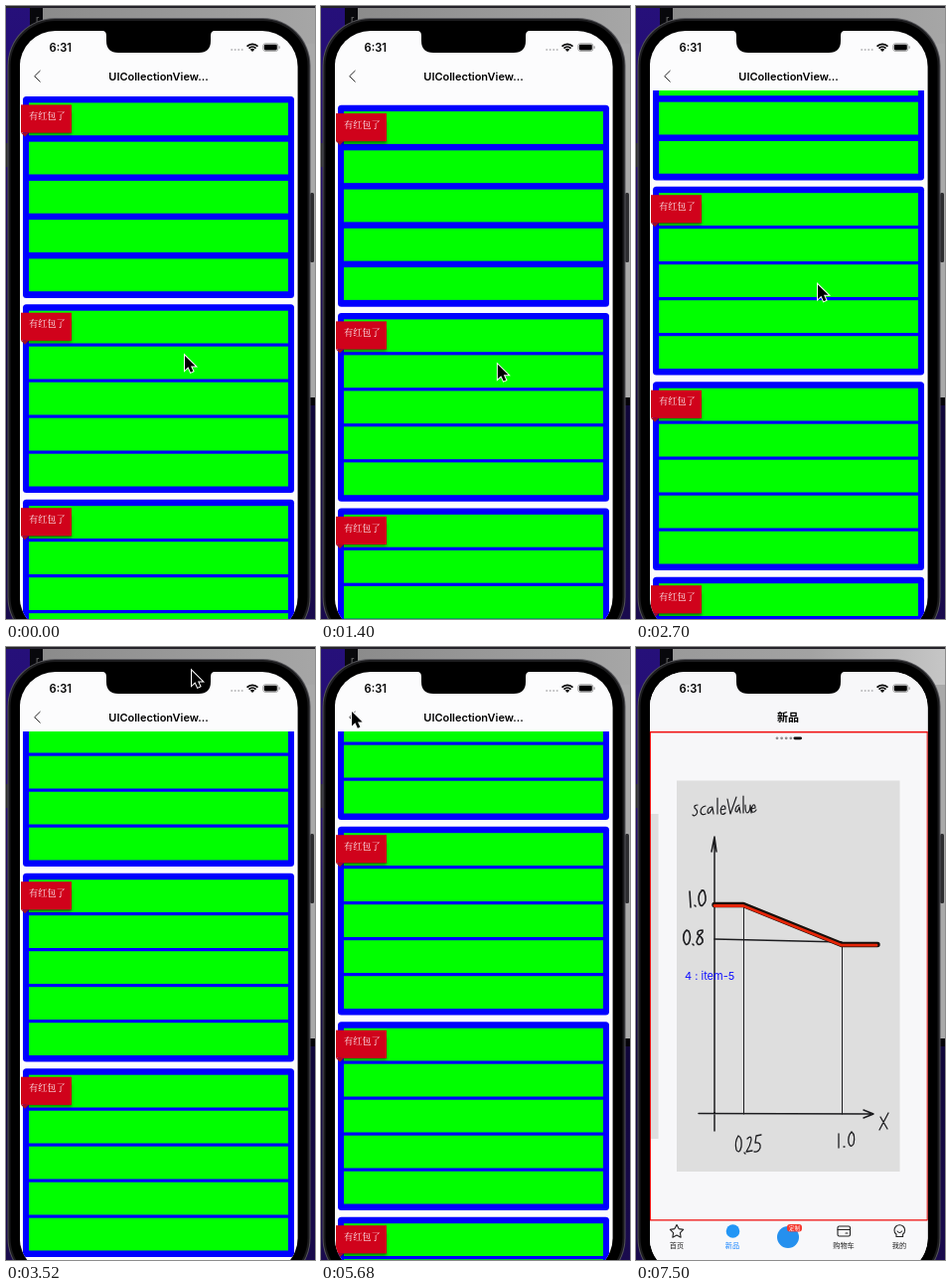
These frames come from a looping animation (311 px wide and 617 px high, 7600 ms). An HTML page with a canvas:

```html
<!DOCTYPE html>
<html lang="zh">
<head>
<meta charset="utf-8">
<style>
html, body { margin: 0; width: 100%; height: 100%; overflow: hidden; background: #000; }
canvas { display: block; width: 311px; height: 617px; }
</style>
</head>
<body>
<canvas id="stage"></canvas>
<script>
const W = 311, H = 617, LOOP = 7600;
const SANS = 'Inter, "Noto Sans CJK SC", "Noto Sans CJK", sans-serif';
const SERIF = '"Noto Serif CJK SC", "Noto Sans CJK SC", "Noto Sans CJK", serif';
const canvas = document.getElementById('stage');
const ctx = canvas.getContext('2d');
const dpr = window.devicePixelRatio || 1;
canvas.width = Math.round(W * dpr);
canvas.height = Math.round(H * dpr);

const steps = [
  [0, 0, 1], [650, 880, 5], [1030, 1030, 1], [1080, 1140, 2], [1220, 1700, 7],
  [1840, 1840, 1], [1930, 2050, 3], [2200, 2250, 2], [2430, 2430, 1],
  [2700, 2850, 2], [3120, 3290, 3], [3520, 3750, 2], [3930, 3930, 1],
  [4190, 4370, 2], [4610, 4820, 2], [5020, 5680, 16], [5980, 6180, 3],
  [6360, 6360, 1], [6510, 6640, 4], [7500, 7500, 1]
].flatMap(([a, b, n]) => Array.from({ length: n }, (_, i) => a + (n > 1 ? (b - a) * i / (n - 1) : 0)));

const scrollKeys = [
  [600, 0], [880, 54], [1080, 56], [1400, -13], [1700, 0], [1840, 0], [1930, 2],
  [2050, 100], [2200, 110], [2250, 112], [2430, 115.5], [2700, 118.5], [2850, 121.5],
  [3120, 150], [3205, 205], [3290, 239], [3520, 269]
];
const cursorKeys = [
  [600, 180, 352], [880, 180, 305], [1080, 180, 303], [1500, 177, 384], [1930, 177, 384],
  [2050, 181, 292], [2200, 183, 282], [2850, 183, 280], [3120, 185, 250],
  [3205, 186, 120], [3290, 187, 24], [3520, 187, 24], [3750, 184, 31],
  [3930, 170, 63], [4190, 135, 112], [4370, 116, 134], [4820, 107, 142], [4980, 107, 142],
  [5300, 52, 90], [5680, 31, 65]
];
const popKeys = [[5930, 0], [5980, 0.1], [6080, 0.45], [6180, 0.75], [6360, 0.93], [6640, 1]];

function track(keys, t, col = 1) {
  if (t <= keys[0][0]) return keys[0][col];
  for (let i = 1; i < keys.length; i++) {
    const a = keys[i - 1], b = keys[i];
    if (t < b[0]) return a[col] + (b[col] - a[col]) * (t - a[0]) / (b[0] - a[0]);
  }
  return keys[keys.length - 1][col];
}

function scrollAt(t) {
  if (t <= 3520) return track(scrollKeys, t);
  return t >= 4820 ? 316 : 317 - 48 * Math.exp((3520 - t) / 470);
}

function rect(x, y, w, h, color) {
  ctx.fillStyle = color;
  ctx.fillRect(x, y, w, h);
}

function round(x, y, w, h, r, color) {
  ctx.beginPath();
  ctx.roundRect(x, y, w, h, r);
  ctx.fillStyle = color;
  ctx.fill();
}

function dot(x, y, r, color) {
  ctx.beginPath();
  ctx.arc(x, y, r, 0, 7);
  ctx.fillStyle = color;
  ctx.fill();
}

function text(str, x, y, font, color, align = 'left') {
  ctx.font = font;
  ctx.fillStyle = color;
  ctx.textAlign = align;
  ctx.fillText(str, x, y);
}

function stroke(d, color, width) {
  ctx.strokeStyle = color;
  ctx.lineWidth = width;
  ctx.stroke(new Path2D(d));
}

function gradient(x0, y0, x1, y1, ...colors) {
  const g = ctx.createLinearGradient(x0, y0, x1, y1);
  colors.forEach((c, i) => g.addColorStop(i / (colors.length - 1), c));
  return g;
}

function drawDesktop(blurred) {
  rect(0, 0, W, H, gradient(0, 0, 0, H, '#26107a', '#210a66', '#10063a', '#1a0b4e'));
  rect(24, 0, 13, 40, '#08080c');
  text('r', 30, 16, '9px ' + SANS, '#777');
  rect(37, 0, 274, 394, gradient(37, 0, W, 0, '#8b8b8b', '#a6a6a6'));
  rect(0, 0, W, 2, '#25232a');
  if (blurred) rect(37, 2, 274, 36, gradient(37, 0, W, 0, '#9a9a9a', '#a2a2a2', '#c6c6c6'));
  rect(300, 38, 11, 356, '#a9a9a9');
  rect(300, 394, 11, 8, '#050308');
}

function drawBody() {
  round(306, 188, 4, 70, 1.5, '#2d2d30');
  rect(0, 138, 3, 24, '#2d2d30');
  round(1.5, 12, 305, 631, 48, '#55555a');
  round(2.5, 13, 303, 629, 47, '#1b1b1d');
  round(4.5, 15, 299, 625, 45, '#000');
}

function drawTag(y) {
  ctx.save();
  ctx.shadowColor = 'rgba(0,0,0,.5)';
  ctx.shadowBlur = 3 * dpr;
  ctx.shadowOffsetY = 2.5 * dpr;
  rect(20, y + 4, 46, 24, '#d0021b');
  ctx.restore();
  ctx.fillStyle = '#a30f22';
  ctx.fill(new Path2D(`M15 ${y + 28} h8 l-4 4 z`));
  rect(15, y, 51, 28, '#d0021b');
  text('有红包了', 23, y + 14.7, '9.2px ' + SERIF, '#fff');
}

function drawSection(y, height, pitch) {
  round(17, y, 273, height, 3.5, '#00f');
  for (let i = 0; i < 5; i++) rect(23, y + 6.4 + i * pitch, 261, 32.8, '#0f0');
  drawTag(y + 8.4);
}

function drawList(scroll) {
  rect(14, 85, 280, H, '#fcfcfd');
  ctx.save();
  ctx.beginPath();
  ctx.rect(14, 85, 280, H);
  ctx.clip();
  drawSection(91 - scroll, 203, 39.25);
  for (let y = 300.3 - scroll; y < H; y += 196.5) {
    if (y > -120) drawSection(y, 189.7, 36);
  }
  ctx.restore();
}

function drawSketch() {
  const ink = '#1c1c1f';
  ctx.lineCap = ctx.lineJoin = 'round';
  stroke('M79 487 V191 m-3 15 l3 -15 l2 15 M63 469.5 L239 470 m-10 -4 l10 4 l-10 4', ink, 1.5);
  stroke('M79 294 L207 297', ink, 1.6);
  stroke('M108.5 262 V470 M207.5 300 V470', ink, 1);
  const curve = 'M79 259.5 H108 L207 299.5 H243';
  stroke(curve, '#17100d', 5.4);
  stroke('M79 260.5 H108 L207 300.2 H242', '#e52507', 2.8);
  // scaleValue
  stroke('M62 159q-4 0 -3 3q4 3 2 6q-2 3 -4 1 M70 160q-5 1 -5 6q1 4 5 2' +
    ' M77 161q-5 0 -5 5q1 4 5 -4l1 6 M82 152v16 M85 164l5 -1q0 -4 -3 -3q-3 4 -1 8q2 1 4 -1' +
    ' M92 153l3 15l6 -17 M104 159q-4 1 -4 6q2 3 4 -4l1 6 M108 150v17' +
    ' M110 159q0 8 2 8q3 -1 3 -8l1 8 M116 163l4 -1q0 -4 -2 -3q-3 4 -1 7q2 1 4 -2', ink, 1.2);
  // axis labels
  stroke('M54 246l1 16 M59 260l1 1 M67 245q-4 2 -4 9q1 8 4 6q5 -4 2 -13q-1 -3 -3 -2' +
    ' M51 285q-4 3 -3 10q2 7 5 3q3 -6 0 -12z M57 299l1 1' +
    ' M67 285q-6 0 -5 4q6 4 5 8q-4 5 -6 0q1 -5 6 -10z', ink, 1.6);
  stroke('M103 492q-4 6 -2 14q3 5 5 -3q1 -9 -3 -11 M109 509l1 1' +
    ' M112 495q4 -4 4 1q-1 6 -5 12l6 -1 M126 491l-5 1l-1 7q6 -1 5 5q-2 5 -6 4' +
    ' M204 490v14 M209 503h1 M217 488q-4 4 -3 11q2 6 5 1q2 -9 -2 -12' +
    ' M246 473l7 12 M254 469l-9 17', ink, 1.3);
}

function drawTabs() {
  const ink = '#222';
  rect(14, 577, 280, 60, '#f8f8fa');
  let star = '';
  for (let i = 0; i < 10; i++) {
    const r = i % 2 ? 3.6 : 7, a = i * Math.PI / 5 - Math.PI / 2;
    star += (i ? 'L' : 'M') + (41 + r * Math.cos(a)) + ' ' + (588.5 + r * Math.sin(a));
  }
  stroke(star + 'z', ink, 1.1);
  dot(97.5, 588, 6.8, '#2396f5');
  dot(153, 594, 11, '#2590ee');
  round(152, 581, 15, 7.5, 3, '#f5392f');
  text('定制', 159.5, 587, '5.5px ' + SANS, '#fff', 'center');
  ctx.beginPath();
  ctx.roundRect(203, 583, 12.5, 10, 1.5);
  ctx.strokeStyle = ink;
  ctx.lineWidth = 1.1;
  ctx.stroke();
  stroke('M203 586.5 h12.5 M211 590 h2', ink, 1.1);
  stroke('M260 587 a5.3 5.3 0 1 1 10.6 0 q0 3 -2 4 v2.5 h-6.6 v-2.5 q-2 -1 -2 -4 M263 588 q2.3 3 4.6 0', ink, 1.1);
  [['首页', 41], ['新品', 97], ['购物车', 209], ['我的', 265]].forEach(([label, x]) =>
    text(label, x, 604.5, '7.2px ' + SANS, x === 97 ? '#1583ff' : ink, 'center'));
}

function drawHome() {
  rect(14, 24, 280, H, '#f7f7f9');
  rect(14, 168, 8.5, 327, '#dedede');
  rect(41, 134.5, 224.5, 393.5, '#dedede');
  drawSketch();
  text('4 : item-5', 49, 335, '11px ' + SANS, '#1010ff');
  for (let i = 0; i < 4; i++) dot(142 + i * 4.6, 91.8, 1.4, '#8c8c8e');
  round(158.5, 90.4, 8.5, 2.8, 1.4, '#000');
  drawTabs();
  ctx.strokeStyle = '#f00a0a';
  ctx.lineWidth = 1.3;
  ctx.strokeRect(14.3, 85.5, 279, 491.3);
}

function drawNav(pop) {
  rect(14, 24, 280, 61, pop > 0.5 ? '#f7f7f9' : '#fcfcfd');
  ctx.globalAlpha = 1 - pop;
  ctx.lineCap = 'butt';
  ctx.lineJoin = 'miter';
  stroke('M34.5 65 L28.7 70.7 L34.5 76.4', '#222', 1);
  text('UICollectionView…', 153.5 + pop * 110, 75, '600 11px ' + SANS, '#000', 'center');
  ctx.globalAlpha = pop;
  text('新品', 153 - (1 - pop) * 80, 75, '700 11px ' + SANS, '#000', 'center');
  ctx.globalAlpha = 1;
}

function drawStatus() {
  text('6:31', 43.5, 45.5, '600 11.2px ' + SANS, '#000');
  for (let i = 0; i < 4; i++) dot(227.2 + i * 3.5, 44, 1, '#b9b9bc');
  ctx.lineCap = 'butt';
  for (const r of [7.7, 4.9]) {
    ctx.beginPath();
    ctx.arc(248, 46, r, -Math.PI * 0.75, -Math.PI * 0.25);
    ctx.strokeStyle = '#000';
    ctx.lineWidth = 1.8;
    ctx.stroke();
  }
  ctx.fillStyle = '#000';
  ctx.fill(new Path2D('M248 46 l-2.2 -2.3 q2.2 -1.7 4.4 0 z'));
  ctx.beginPath();
  ctx.roundRect(258.8, 37.8, 15, 7.6, 2.2);
  ctx.strokeStyle = '#8a8a8a';
  ctx.lineWidth = 0.8;
  ctx.stroke();
  round(259.8, 38.8, 13, 5.6, 1.3, '#000');
  rect(274.6, 40.4, 1, 2.4, '#8a8a8a');
}

function drawNotch() {
  ctx.fillStyle = '#000';
  ctx.fill(new Path2D('M97 24 V25 Q101 25 101 30 V35 Q101 47 113 47 H194 Q206 47 206 35 V30 Q206 25 210 25 V24 Z'));
}

function drawCursor(x, y) {
  const arrow = new Path2D(`M${x} ${y} v14.5 l3.4 -3.2 l2.5 5.4 l2.5 -1.1 l-2.4 -5.2 h4.6 z`);
  ctx.lineJoin = 'miter';
  ctx.strokeStyle = '#fff';
  ctx.lineWidth = 2;
  ctx.stroke(arrow);
  ctx.fillStyle = '#000';
  ctx.fill(arrow);
}

function draw(t) {
  const pop = track(popKeys, t);
  ctx.setTransform(dpr, 0, 0, dpr, 0, 0);
  drawDesktop(t >= 7500);
  drawBody();

  ctx.save();
  ctx.beginPath();
  ctx.roundRect(13.8, 25, 279.8, 606, 36);
  ctx.clip();
  if (pop > 0) {
    ctx.save();
    ctx.translate(-84 * (1 - pop), 0);
    drawHome();
    ctx.restore();
    rect(14, 85, 280, H, `rgba(0,0,0,${0.1 * (1 - pop)})`);
  }
  if (pop < 1) {
    ctx.save();
    ctx.translate(280 * pop, 0);
    drawList(scrollAt(t));
    ctx.restore();
  }
  drawNav(pop);
  if (pop === 1) rect(13.7, 84.9, 280, 1.3, '#f00a0a');
  drawStatus();
  drawNotch();
  ctx.restore();

  if (t < 7500) drawCursor(track(cursorKeys, t, 1), track(cursorKeys, t, 2));
}

function frame() {
  const t = performance.now() % LOOP;
  draw(steps.filter(s => s <= t).pop());
  requestAnimationFrame(frame);
}
frame();
</script>
</body>
</html>
```
